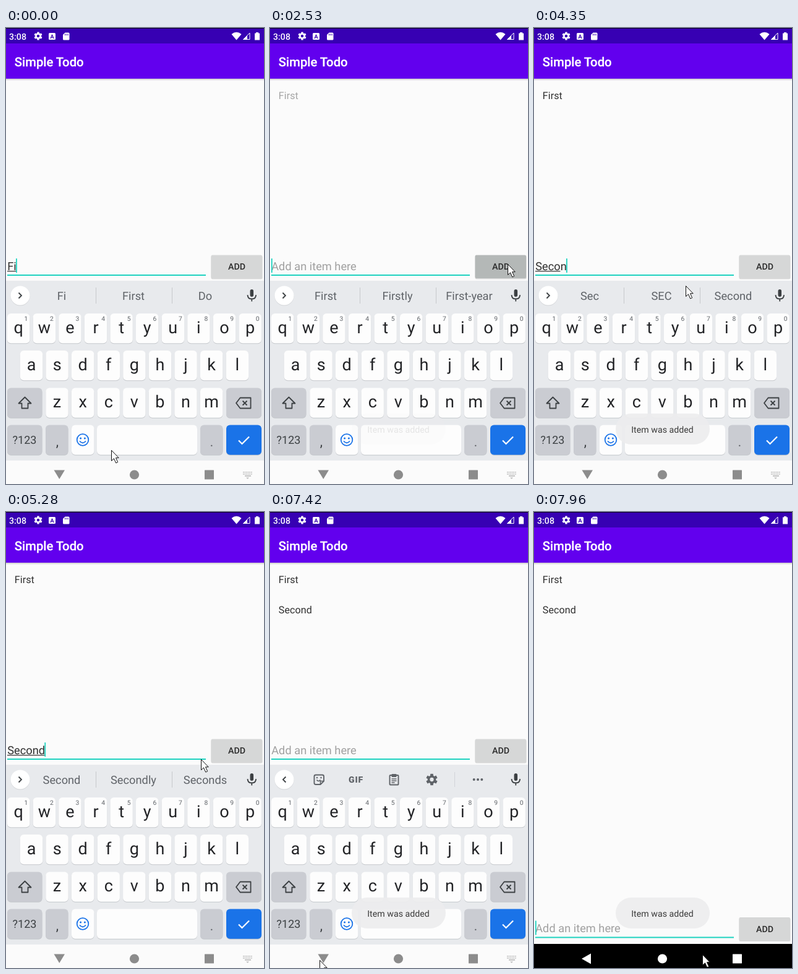
An HTML page for the animation above (8 s loop, 417x738 px).

```html
<!DOCTYPE html>
<html lang="en">
<head>
<meta charset="utf-8">
<title>Todo list</title>
<style>
html, body { margin: 0; width: 100%; height: 100%; overflow: hidden; background: #fafafa; }
svg { display: block; width: 100%; height: 100%; font-family: Roboto, Arial, sans-serif; }
text { white-space: pre; text-rendering: geometricPrecision; }
</style>
</head>
<body>
<svg id="stage" viewBox="0 0 417 738"></svg>
<script>
const LOOP = 8000;
const stage = document.getElementById('stage');

const rect = (x, y, w, h, fill, r = 0, more = '') =>
  `<rect x="${x}" y="${y}" width="${w}" height="${h}" rx="${r}" fill="${fill}" ${more}/>`;
const disc = (x, y, r, fill, more = '') =>
  `<circle cx="${x}" cy="${y}" r="${r}" fill="${fill}" ${more}/>`;
const text = (x, y, size, fill, str, more = '') =>
  `<text x="${x}" y="${y}" font-size="${size}" fill="${fill}" ${more}>${str}</text>`;
const shape = (d, fill, more = '') => `<path d="${d}" fill="${fill}" ${more}/>`;
const line = (d, color, w, more = '') =>
  `<path d="${d}" fill="none" stroke="${color}" stroke-width="${w}" ${more}/>`;
const group = (id, inner, more = '') => `<g id="${id}" ${more}>${inner}</g>`;
const MID = 'text-anchor="middle"';
const BOLD = 'font-weight="500"';

function gear(x, y, r, fill, hole) {
  let teeth = '';
  for (let a = 0; a < 180; a += 60)
    teeth += rect(x - r * .26, y - r, r * .52, r * 2, fill, .6, `transform="rotate(${a} ${x} ${y})"`);
  return teeth + disc(x, y, r * .74, fill) + disc(x, y, r * .34, hole);
}

function statusBar() {
  const bg = '#3700b3', w = '#fff';
  return rect(0, 0, 417, 25, bg) + rect(0, 0, 417, 1, '#0c0020') +
    text(5, 18.5, 14.2, w, '3:08', BOLD) +
    gear(52, 13, 6.6, w, bg) +
    rect(69, 8, 11, 11, w, 1.5) + text(74.5, 17, 9, bg, 'A', MID + ' font-weight="700"') +
    shape('M95.5 7.5H101q1.5 0 1.5 1.5v9q0 1.5-1.5 1.5H93.5q-1.5 0-1.5-1.5V11z', w) +
    line('M95.5 9.5v2.5M97.8 9.5v2.5M100.1 9.5v2.5', bg, 1) +
    shape('M364.5 10q8-6.5 16 0l-8 9.5z', w) +
    line('M383.5 18.5L394 8v10.5z', w, 1) + shape('M383 19l7-7v7z', w) +
    shape('M402 8.5h2V7h4v1.5h2V19.5h-8z', w);
}

function appBar() {
  return rect(0, 82, 417, 3.5, 'url(#drop)') + rect(0, 25, 417, 57, '#6200ee') +
    text(13.8, 62, 20.3, '#fff', 'Simple Todo', BOLD + ' stroke="#fff" stroke-width=".25"');
}

function inputRow() {
  return text(2.2, 391.5, 18.26, '#a0a0a0', 'Add an item here', 'id="hint"') +
    text(2.2, 391.5, 18.26, '#303030', '', 'id="typed"') +
    rect(2, 393, 0, 1.2, '#333', 0, 'id="under"') +
    rect(2, 399, 321, 2, '#1fd3c0') +
    rect(2, 373, 1.8, 23, '#1fd3c0', 0, 'id="caret"') +
    rect(331.5, 368.5, 83, 38, '#000', 2.5, 'opacity=".14"') +
    rect(331.5, 367.5, 82.5, 37.5, '#d6d7d7', 2, 'id="add"') +
    text(373, 391, 14.2, '#2a2a2a', 'ADD', MID + ' ' + BOLD);
}

const key = (x, y, w, fill = '#fdfdfd') =>
  rect(x, y + 1, w, 48.2, '#c4c7cb', 6) + rect(x, y, w, 48.2, fill, 6);

function letters(str, x0, y) {
  return [...str].map((c, i) => {
    const x = x0 + i * 41.6;
    return key(x - 18.2, y, 36.4) + text(x, y + 31.5, 27, '#232427', c, MID);
  }).join('');
}

function smile(x, y, r, color) {
  return disc(x, y, r, 'none', `stroke="${color}" stroke-width="1.8"`) +
    disc(x - 3.4, y - 2.6, 1.5, color) + disc(x + 3.4, y - 2.6, 1.5, color) +
    line(`M${x - 5} ${y + 2}q5 6 10 0`, color, 1.8);
}

function keyboard() {
  const mod = '#caccd2', ink = '#3c4043', grey = '#5f6368';
  const digits = [...'1234567890'].map((d, i) =>
    text(32.3 + i * 41.6, 474, 10.3, grey, d, MID)).join('');
  const words = [90, 206, 322].map((x, i) =>
    text(x, 440, 18.26, grey, '', `id="word${i}" ${MID}`)).join('');
  const tools =
    line('M25.5 428.5l-4.5 4.5 4.5 4.5', ink, 1.8) +
    line('M74 425.5h10.5q2.5 0 2.5 2.5v7.5l-5.5 5.5H74q-2.5 0-2.5-2.5v-10.5q0-2.5 2.5-2.5z', grey, 1.9) +
    line('M81.5 441v-5.5H87M75.5 433.5q3 4 6 0', grey, 1.6) +
    disc(76, 430, 1.2, grey) + disc(82.5, 430, 1.2, grey) +
    text(139, 438, 14, grey, 'GIF', MID + ' font-weight="800" letter-spacing=".8"') +
    rect(193.5, 426, 14, 15.5, 'none', 1, `stroke="${grey}" stroke-width="1.9"`) +
    rect(196.5, 424, 8, 5, grey, 1) +
    line('M196.5 432h8M196.5 435h8M196.5 438h5', grey, 1.3) +
    gear(261.5, 433, 9.2, grey, '#e8eaed') +
    rect(298, 421, 1, 24, '#d2d4d8') +
    [329.7, 336, 342.3].map(x => disc(x, 433, 2, grey)).join('');

  return rect(0, 409, 417, 330, '#e8eaed') +
    disc(23, 434, 15.5, '#d3d5d8') + disc(23, 433, 15.5, '#fff') +
    group('words', words + line('M20.5 428.5l4.5 4.5-4.5 4.5', ink, 1.8) +
      rect(145, 420, 1, 26, '#c6c8cc') + rect(268, 420, 1, 26, '#c6c8cc')) +
    group('tools', tools) +
    rect(394.5, 423, 5.5, 12, ink, 2.75) +
    line('M390.5 432q0 6.5 6.75 6.5t6.75-6.5M397.25 438.5v4', ink, 1.8) +
    letters('qwertyuiop', 20.2, 462) + digits +
    letters('asdfghjkl', 41, 522) +
    letters('zxcvbnm', 82.5, 582.5) +
    key(2, 582.5, 56.5, mod) +
    line('M30.5 597.5l10 10h-5v8h-10v-8h-5z', ink, 1.8, 'stroke-linejoin="round"') +
    key(356, 582.5, 57, mod) +
    line('M378.5 598.5h17v17h-17l-6.5-8.5z', ink, 1.8, 'stroke-linejoin="round"') +
    line('M382.5 603.5l7 7m0-7l-7 7', ink, 1.8) +
    key(2, 642.5, 56.5, mod) + text(30, 673, 18, ink, '?123', MID) +
    key(64, 642.5, 36.5, mod) + text(83, 677, 22, ink, ',', MID) +
    key(106, 642.5, 36.5) + smile(124, 666.5, 9.3, '#1a73e8') +
    key(147, 642.5, 162) +
    key(314, 642.5, 36.5, mod) + text(332.5, 677, 22, '#6a6d72', '.', MID) +
    key(356, 642.5, 57, '#1a73e8') +
    line('M376 667.5l5.5 5.5 11.5-11.5', '#fff', 2.2);
}

function navBars() {
  const buttons = fill => disc(207.5, 723, 7.6, fill) + rect(321, 715.5, 15, 15, fill, .5);
  const pale = '#bdbdbd';
  let dots = '';
  for (let i = 0; i < 12; i++)
    dots += rect(383 + i % 6 * 2.6, 718 + (i / 6 | 0) * 3, 1.6, 1.8, pale);
  const light = rect(0, 700, 417, 38, '#fbfbfb') + buttons('#8c8c8c') +
    shape('M77.5 715.5h17.5l-8.75 14.5z', '#8c8c8c') +
    dots + rect(386, 724, 10, 1.8, pale) + shape('M388 727.5h5l-2.5 2.5z', pale);
  const dark = rect(0, 699, 417, 39, '#000') + buttons('#fff') +
    shape('M92 714.5v17l-15-8.5z', '#fff');
  return group('navLight', light) + group('navDark', dark);
}

stage.innerHTML =
  `<defs><linearGradient id="drop" x2="0" y2="1"><stop stop-color="#000" stop-opacity=".2"/>
   <stop offset="1" stop-color="#000" stop-opacity="0"/></linearGradient></defs>` +
  rect(0, 0, 417, 738, '#fbfbfb') + appBar() + statusBar() +
  text(13.8, 114.5, 16.2, '#303030', 'First', 'id="item0"') +
  text(13.8, 163.5, 16.2, '#303030', 'Second', 'id="item1"') +
  group('row', inputRow()) + group('kb', keyboard()) + navBars() +
  group('toast', rect(132, 624, 152, 50, '#ededee', 25, 'fill-opacity=".93"') +
    text(207.5, 655, 14.2, '#3a3a3a', 'Item was added', MID)) +
  group('arrow', shape('M.5.5V17.5l4-3.7 3.2 7.2 3-1.3-3.2-7H12.2z', '#fff',
    'stroke="#111" stroke-width="1" stroke-linejoin="round"'));

const el = {};
stage.querySelectorAll('[id]').forEach(n => el[n.id] = n);

// Each step lists only what changes at that time.
const STEPS = [
  [0, { typed: 'Fi', under: 2, caret: 1, words: ['Fi', 'First', 'Do'], item0: 0, item1: 0,
        add: '#d6d7d7', toast: 0, drop: -1 }],
  [250, { typed: 'Fir', under: 3 }],
  [500, { typed: 'Firs', under: 4, words: ['Fir', 'First', 'Fire'] }],
  [750, { typed: 'First', under: 5, words: ['Firs', 'First', 'Firsts'] }],
  [1000, { words: ['First', 'Firstly', 'First-year'] }],
  [1500, { caret: 0 }], [1650, {}], [1790, {}],
  [1940, { caret: 1 }], [2090, {}],
  [2230, {}],
  [2380, { add: '#c3c6c5', under: 0 }],
  [2530, { typed: '', add: '#b4b8b7', item0: .42, toast: .12 }],
  [2680, { add: '#c5c8c7', item0: .85, toast: .6, words: null }],
  [2820, { add: '#d6d7d7', item0: 1, toast: 1 }],
  [2960, {}],
  [3500, { typed: 'S', under: 1 }],
  [3760, { words: ['S', 'So', 'See'] }],
  [4070, { typed: 'Se', under: 2 }],
  [4210, { typed: 'Seco', under: 4, words: ['Sec', 'SEC', 'Second'] }],
  [4350, { typed: 'Secon' }],
  [4490, { typed: 'Second', under: 6 }],
  [4620, { words: ['Second', 'SECOND', 'Seconds'] }],
  [4760, { words: ['Second', 'Secondly', 'Seconds'] }],
  [5040, { toast: .5 }],
  [5190, { toast: 0 }],
  [5330, {}],
  [5480, { add: '#c3c6c5', under: 0 }],
  [5630, { typed: '', add: '#b4b8b7', item1: .42, toast: .12 }],
  [5780, { add: '#c5c8c7', item1: .85, toast: .6, words: null }],
  [5920, { add: '#d6d7d7', item1: 1, toast: 1 }],
  [6070, {}],
  [6190, { caret: 0 }], [6330, {}], [6460, {}],
  [6600, { caret: 1 }], [6730, {}], [6870, {}], [7000, {}],
  [7140, { caret: 0 }],
  [7290, { caret: 1 }],
  [7420, { caret: 0 }],
  [7550, { drop: 120 }],
  [7690, { drop: 340 }],
  [7820, { caret: 1 }],
  [7960, {}]
];

// Pointer moves: first step, last step, from, to.
const MOVES = [
  [1500, 2230, [170, 683], [384, 382]],
  [2680, 2960, [384, 382], [245, 417]],
  [5040, 5480, [245, 417], [384, 382]],
  [5780, 6070, [384, 382], [321, 549]],
  [6190, 7140, [321, 549], [80, 725]],
  [7550, 7960, [80, 725], [272, 716]]
];
const GAP = 140;

const states = [];
let full = {};
for (const [at, change] of STEPS) states.push(full = { ...full, ...change, at });

function pointer(t) {
  let pos = MOVES[0][2];
  for (const [a, b, from, to] of MOVES) {
    if (t < a) break;
    const p = Math.min(1, (t - a + GAP) / (b - a + GAP));
    const e = p * p * (3 - 2 * p);
    pos = from.map((v, i) => Math.round(v + (to[i] - v) * e));
  }
  return pos;
}

const set = (id, name, value) => el[id].setAttribute(name, value);
const show = (id, on) => set(id, 'opacity', +on);
const shift = (id, x, y) => set(id, 'transform', `translate(${x} ${y})`);

function draw(s) {
  el.typed.textContent = s.typed;
  const width = n => n && s.typed ? el.typed.getSubStringLength(0, Math.min(n, s.typed.length)) : 0;
  set('under', 'width', width(s.under));
  set('caret', 'x', s.typed ? 1.5 + width(s.typed.length) : 2);
  show('caret', s.caret);
  show('hint', !s.typed);
  set('add', 'fill', s.add);
  for (const id of ['item0', 'item1', 'toast']) show(id, s[id]);
  show('words', !!s.words);
  show('tools', !s.words);
  if (s.words) s.words.forEach((w, i) => el['word' + i].textContent = w);
  const hidden = s.drop >= 0;
  shift('row', 0, hidden ? 288.5 : 0);
  shift('kb', 0, Math.max(0, s.drop));
  show('navLight', !hidden);
  show('navDark', hidden);
  shift('arrow', ...pointer(s.at));
}

let last = null;
function tick() {
  const t = performance.now() % LOOP;
  let s = states[0];
  for (const next of states) if (next.at <= t) s = next;
  if (s !== last) draw(last = s);
  requestAnimationFrame(tick);
}
tick();
</script>
</body>
</html>
```
